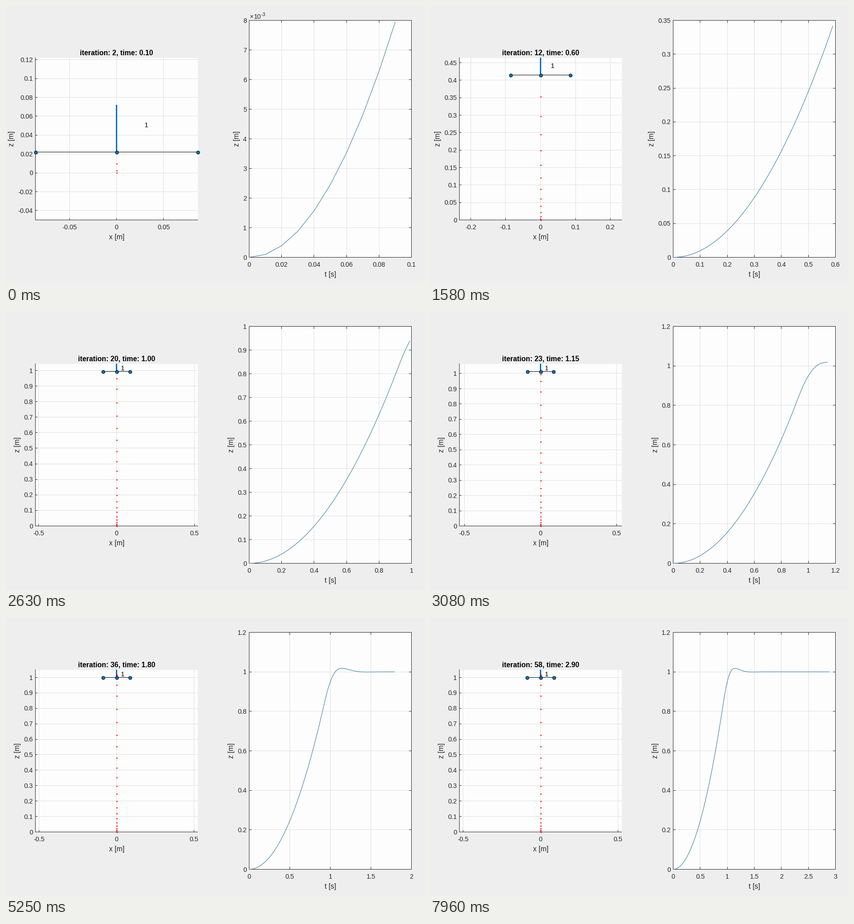
A matplotlib script that plays this animation: 917x610 px, repeating every 8 s.

```python
import numpy as np
import matplotlib.pyplot as plt
from matplotlib.animation import FuncAnimation
from matplotlib.collections import LineCollection
from matplotlib.patches import Rectangle

W, H, DPI = 917, 610, 100
PT = 72 / DPI                      # points per pixel
N, LOOP = 192, 8000
INK, GRID, BLUE = "#262626", "#dfdfdf", "#0072bd"
SMALL, BIG = 14.3, 15.6            # font sizes in pixels
ARM, MAST = 0.086, 0.05

plt.rcParams["font.family"] = "Liberation Sans"

# Panel borders through pixel centres: left, top, right, bottom
SCENE = (64.5, 113.5, 420.5, 469.5)
PLOT = (533.5, 31.5, 889.5, 551.5)


def simulate(t_end, dt=1e-4, kp=185, kd=18.9, g=9.81):
    """Climb to 1 m under PD control with limited thrust, sampled at 10 ms."""
    z = v = 0.0
    out = []
    for i in range(int(round(t_end / dt)) + 1):
        if i % 100 == 0:
            out.append(z)
        a = min(0.2 * g, max(-g, kp * (1 - z) - kd * v))
        z += v * dt + a * dt * dt / 2
        v += a * dt
    return np.array(out)


Z = simulate(3.1)

fig = plt.figure(figsize=(W / DPI, H / DPI), dpi=DPI, facecolor="#eeeeee")
ax = fig.add_axes([0, 0, 1, 1])
ax.set_xlim(0, W)
ax.set_ylim(H, 0)
ax.axis("off")


def text(x, y, s, size=SMALL, ha="center", **kw):
    kw.setdefault("color", INK)
    return ax.text(x, y, s, fontsize=size * PT, ha=ha, va="baseline",
                   rotation_mode="anchor", **kw)


def line(x, y, color, width=1, **kw):
    return ax.plot(x, y, color=color, lw=width * PT, snap=False, **kw)[0]


def segments(segs, color, z):
    lines = LineCollection(segs, colors=color, linewidths=PT, zorder=z,
                           capstyle="projecting")
    lines.set_snap(False)
    return ax.add_collection(lines, autolim=False)


def pixel(v):
    """Centre of the pixel that holds v."""
    return np.floor(v) + 0.5


def text_width(s):
    narrow = {".": 0.278, "-": 0.333}
    return SMALL * sum(narrow.get(c, 0.556) for c in s)


def panel(box, xlabel, closed):
    l, t, r, b = box
    ax.add_patch(Rectangle((l, t), r - l, b - t, fc="#fdfdfd", ec="none", zorder=0))
    edges = [[(l, t), (l, b)], [(l, b), (r, b)]]
    if closed:
        edges += [[(l, t), (r, t)], [(r, t), (r, b)]]
    segments(edges, INK, 3)
    text((l + r) / 2, b + 42.5, xlabel, BIG)


panel(SCENE, "x [m]", False)
panel(PLOT, "t [s]", True)

title = text(242.7, 107.5, "", BIG, weight="bold", color="black")
mast = line([], [], BLUE, 3, zorder=4, solid_capstyle="butt")
trail = line([], [], "red", 0, marker="o", ms=2.7 * PT, mew=0, ls="none", zorder=5)
arms = line([], [], "black", 1, marker="o", ms=7 * PT, mfc=BLUE, mec="black",
            mew=PT, zorder=6)
tag = text(0, 0, "1", ha="left", color="black", zorder=7)
curve = line([], [], "#2b7099", 1, zorder=4)
zlabels = [text(0, 291.5, "z [m]", BIG, rotation=90) for _ in range(2)]
power = [text(534, 28, "×", SMALL, "left"),
         text(543.5, 28, "10", SMALL, "left"),
         text(560, 21.5, "-3", 11, "left")]


def nice_axis(top, most):
    """Smallest 1-2-5 step that covers 0..top in at most `most` intervals."""
    for e in range(-5, 2):
        for m in (1, 2, 5):
            step = m * 10.0 ** e
            n = int(np.ceil(top / step - 1e-9))
            if n <= most:
                return step, n * step


def ticks(lo, hi, step):
    return step * np.arange(np.ceil(lo / step - 1e-6), np.floor(hi / step + 1e-6) + 1)


def fmt(v):
    return f"{round(v, 6) + 0:g}"


temp = []


def ruler(box, xs, xpos, ys, ypos, zlabel, tick, closed, factor=1):
    """Grid, tick marks and numbers of one panel."""
    l, t, r, b = box
    grid, marks = [], []
    for v in xs:
        p = pixel(xpos(v) + 1e-6)
        if l < p < r:
            grid.append([(p, t), (p, b)])
        marks.append([(p, b), (p, b - tick)])
        if closed:
            marks.append([(p, t), (p, t + tick)])
        temp.append(text(xpos(v), b + 20.5, fmt(v)))
    widest = 0
    for v in ys:
        p = pixel(ypos(v) + 1e-6)
        if t < p < b:
            grid.append([(l, p), (r, p)])
        marks.append([(l, p), (l + tick, p)])
        if closed:
            marks.append([(r, p), (r - tick, p)])
        s = fmt(v * factor)
        widest = max(widest, text_width(s))
        temp.append(text(l - 5.5, ypos(v) + 5.1, s, ha="right"))
    temp.append(segments(grid, GRID, 1))
    temp.append(segments(marks, INK, 3))
    zlabel.set_x(l - 15 - widest)


def draw_scene(k):
    l, t, r, b = SCENE
    hist = Z[:5 * k + 1:5]
    z = Z[5 * (k + 1)]
    top = max(z + MAST, hist.max())
    span = max(top, 2 * ARM)
    lo = (top - span) / 2
    scale = (b - t) / span
    mid = (l + r) / 2

    def xpos(v):
        return mid + v * scale

    def ypos(v):
        return b - (v - lo) * scale

    half = span / 2
    xstep = 0.05 if half < 0.2 else 0.1 if half < 0.43 else 0.2 if half < 0.5 else 0.5
    zstep = next(s for s in (0.02, 0.05, 0.1) if s * scale > 30)
    ruler(SCENE, ticks(-half, half, xstep), xpos,
          ticks(lo, lo + span, zstep), ypos, zlabels[0], 4, False)

    mast.set_data([mid, mid], [ypos(z), ypos(z + MAST)])
    trail.set_data(np.full(len(hist), mid), ypos(hist))
    arms.set_data([xpos(-ARM), mid, xpos(ARM)], [pixel(ypos(z))] * 3)
    tag.set_position((xpos(0.03) - 0.5, ypos(z + 0.03) + 7.6))


def draw_plot(k):
    l, t, r, b = PLOT
    z = Z[:5 * k]
    time = 0.01 * np.arange(len(z))
    xstep, xmax = nice_axis(time[-1], 7)
    ystep, ymax = nice_axis(z.max(), 10)

    def xpos(v):
        return l + v / xmax * (r - l)

    def ypos(v):
        return b - v / ymax * (b - t)

    tiny = ymax < 0.0099
    ruler(PLOT, ticks(0, xmax, xstep), xpos, ticks(0, ymax, ystep), ypos,
          zlabels[1], 5, True, 1000 if tiny else 1)
    for p in power:
        p.set_visible(tiny)
    curve.set_data(xpos(time), ypos(z))


def iteration(i):
    """The simulation's uneven pace: step shown at loop position i."""
    pace = np.interp(i, [0, 16, 38, 52, 74, 126, 191], [2, 6, 12, 16, 23, 36, 58])
    return int(pace + 0.5)


def update(i):
    k = iteration(i)
    for a in temp:
        a.remove()
    temp.clear()
    title.set_text(f"iteration: {k}, time: {0.05 * k:4.2f}")
    draw_scene(k)
    draw_plot(k)
    return []


anim = FuncAnimation(fig, update, frames=N, interval=LOOP / N, repeat=True,
                     repeat_delay=0, init_func=lambda: [], blit=False)
plt.show()
```
